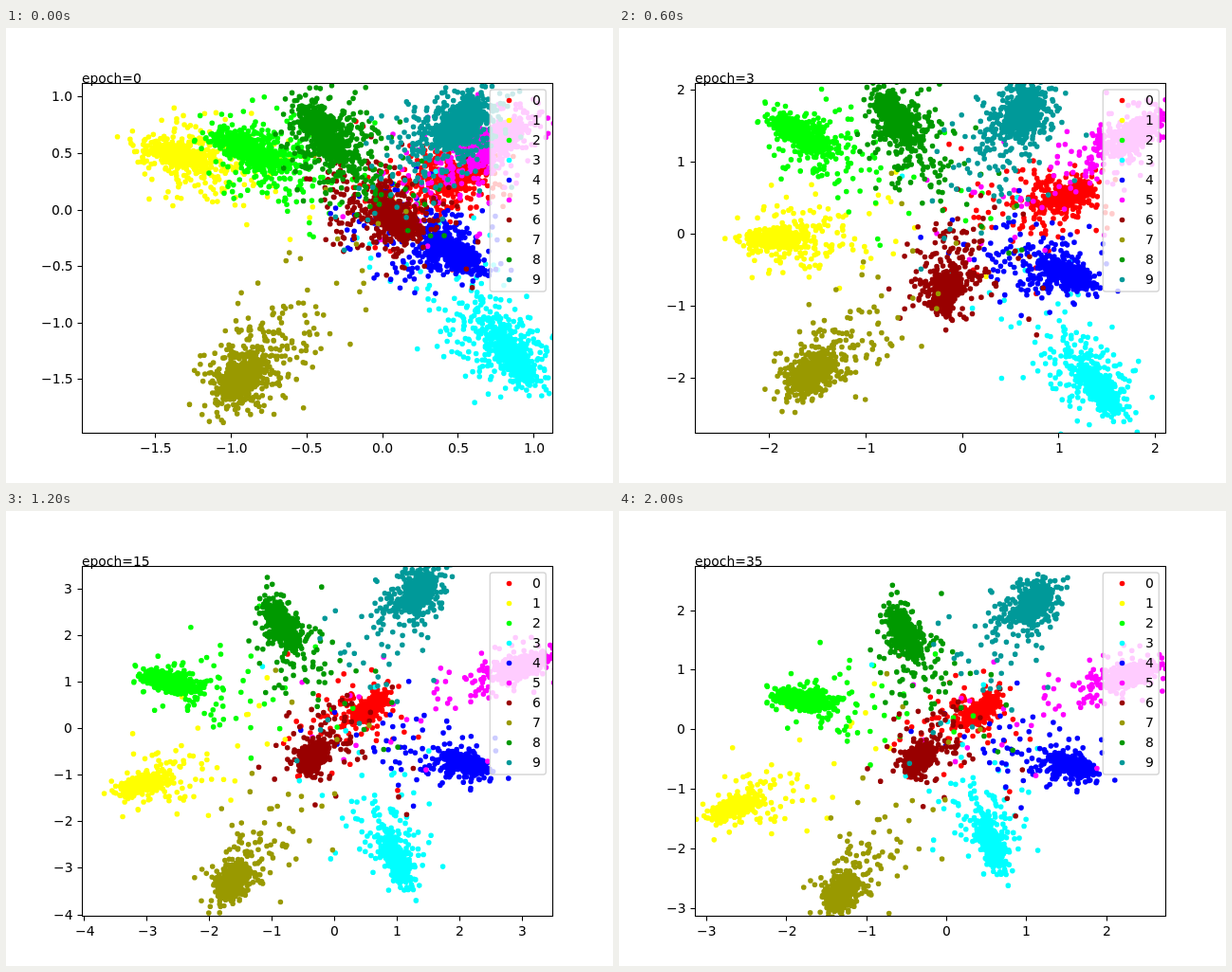
Recreate the animation shown at these times as an HTML page with a canvas. Size 640 by 480 pixels, loop 2200 ms.

```html
<!DOCTYPE html>
<html lang="en">
<head>
<meta charset="utf-8">
<title>Clusters by epoch</title>
<style>
  html, body { margin: 0; width: 100%; height: 100%; overflow: hidden; background: #fff; }
  canvas { display: block; }
</style>
</head>
<body>
<canvas id="stage" width="640" height="480"></canvas>
<script>
const ctx = document.getElementById('stage').getContext('2d');
const STEP = 200;
const STEPS = 11;
const BOX = { l: 80, t: 58, r: 576, b: 427 };
const COUNT = 800;
const DOT = 2.8;

// Camera: pixels per unit and pixel of zero, for x then y
const VIEW_KEYS = [0, 1, 2, 4, 6, 8, 10];
const VIEWS = [
  [159.6, 397, 119.2, 191.4], [136.3, 379.2, 101.7, 204.6],
  [119.5, 366.5, 89, 214], [84.4, 357.5, 63, 220.5],
  [65.9, 346.5, 49.1, 229], [69.8, 351.7, 52.1, 225],
  [84.3, 345.5, 62.8, 230]
];
const PATH_KEYS = [0, 2, 4, 6, 10];

const groups = [];

function randomFrom(seed) {
  return () => {
    seed = (seed + 0x6D2B79F5) | 0;
    let t = Math.imul(seed ^ (seed >>> 15), seed | 1);
    t ^= t + Math.imul(t ^ (t >>> 7), t | 61);
    return ((t ^ (t >>> 14)) >>> 0) / 4294967296;
  };
}

// path holds the centre in plot units; long and short are the first spread in pixels
function addGroup(color, long, short, path) {
  const rnd = randomFrom(groups.length * 977 + 31);
  const bell = () => (rnd() + rnd() + rnd() - 1.5) * 2;
  const points = Array.from({ length: COUNT }, () => ({
    kind: rnd(), a: bell(), b: bell(), reach: -Math.log(1 - rnd() * 0.97), pull: rnd()
  }));
  groups.push({ color, long, short, path, points });
}

addGroup('#f00', 16, 7, [[0.52, 0.31], [1.01, 0.63], [1.21, 0.44], [0.57, 0.45], [0.44, 0.33]]);
addGroup('#ff0', 17, 6, [[-1.36, 0.48], [-1.69, 0.11], [-2.16, -0.26], [-3.06, -1.2], [-2.65, -1.31]]);
addGroup('#0f0', 20, 7, [[-0.89, 0.53], [-1.37, 1.2], [-1.98, 1.55], [-2.65, 0.98], [-1.81, 0.48]]);
addGroup('#0ff', 20, 7, [[0.85, -1.29], [1.31, -1.78], [1.51, -2.5], [0.99, -2.81], [0.56, -1.91]]);
addGroup('#00f', 17, 6, [[0.46, -0.38], [0.78, -0.58], [1.39, -0.55], [2.1, -0.77], [1.57, -0.62]]);
addGroup('#f0f', 21, 8, [[0.77, 0.62], [1.45, 1.19], [2.16, 1.63], [3.01, 1.34], [2.31, 0.92]]);
addGroup('#900', 12, 7, [[0.09, -0.11], [-0.22, -0.82], [-0.15, -0.82], [-0.36, -0.63], [-0.36, -0.51]]);
addGroup('#990', 16, 10, [[-0.93, -1.5], [-1.39, -1.55], [-1.75, -2.34], [-1.62, -3.28], [-1.31, -2.74]]);
addGroup('#090', 20, 9, [[-0.39, 0.7], [-0.71, 1.42], [-0.68, 1.83], [-0.86, 2.26], [-0.54, 1.64]]);
addGroup('#099', 17, 11, [[0.53, 0.77], [0.59, 1.42], [0.68, 1.96], [1.34, 2.93], [1.09, 2.12]]);

const mix = (a, b, f) => a + (b - a) * f;

// Linear blend of rows placed at the given keys
function blend(keys, rows, at) {
  let k = 0;
  while (k < keys.length - 2 && at > keys[k + 1]) k++;
  const f = (at - keys[k]) / (keys[k + 1] - keys[k]);
  return rows[k].map((v, j) => mix(v, rows[k + 1][j], f));
}

function dot(x, y) {
  ctx.moveTo(x + DOT, y);
  ctx.arc(x, y, DOT, 0, Math.PI * 2);
}

// Each cloud points away from the plot's zero; its loose points drift back to it
function drawGroup(g, at, [sx, x0, sy, y0]) {
  const [px, py] = blend(PATH_KEYS, g.path, at);
  const dx = px * sx, dy = -py * sy;
  const cx = x0 + dx, cy = y0 + dy;
  const far = Math.hypot(dx, dy);
  const cos = dx / far, sin = dy / far;
  const settle = Math.min(1, at / 6);
  const size = mix(1, 0.65, settle);
  const stray = mix(0.045, 0.025, settle);
  const loose = mix(0.3, 0.13, settle);
  const halo = mix(25, 19, settle);
  ctx.fillStyle = g.color;
  ctx.beginPath();
  for (const p of g.points) {
    if (p.kind < stray) {
      const t = 0.1 + 0.75 * p.pull;
      dot(cx - dx * t + p.a * 42, cy - dy * t + p.b * 36);
    } else if (p.kind < loose) {
      const back = p.reach * 27;
      dot(cx - cos * back + p.a * halo, cy - sin * back + p.b * halo * 0.8);
    } else {
      const stretch = size * (0.55 + 0.35 * p.reach);
      const u = p.a * g.long * stretch, v = p.b * g.short * stretch;
      dot(cx + u * cos - v * sin, cy + u * sin + v * cos);
    }
  }
  ctx.fill();
}

// Places text on whole pixels; shift is the part of its width left of x
function text(str, x, y, shift = 0) {
  const left = x - ctx.measureText(str).width * shift;
  ctx.fillText(str, Math.round(left), Math.round(y));
}

function line(x1, y1, x2, y2) {
  ctx.beginPath();
  ctx.moveTo(x1, y1);
  ctx.lineTo(x2, y2);
  ctx.stroke();
}

function ticks(scale, zero, from, to, put) {
  const step = (to - from) / Math.abs(scale) > 4.6 ? 1 : 0.5;
  for (let v = -4; v <= 4; v += step) {
    const p = zero + v * scale;
    if (p < from || p > to) continue;
    const label = Math.abs(v).toFixed(step < 1 ? 1 : 0);
    put(p, v < 0 ? '\u2212' + label : label);
  }
}

function drawAxes([sx, x0, sy, y0]) {
  ctx.strokeStyle = ctx.fillStyle = '#000';
  ctx.lineWidth = 1.1;
  ctx.strokeRect(BOX.l + 0.5, BOX.t + 0.5, BOX.r - BOX.l, BOX.b - BOX.t);
  ticks(sx, x0, BOX.l, BOX.r, (x, label) => {
    const mid = Math.floor(x) + 0.5;
    line(mid, BOX.b + 1, mid, BOX.b + 5.5);
    text(label, x, 448, 0.5);
  });
  ticks(-sy, y0, BOX.t, BOX.b, (y, label) => {
    const mid = Math.round(y + 0.1) + 0.5;
    line(BOX.l - 4.5, mid, BOX.l, mid);
    text(label, 70.3, y + 5.1, 1);
  });
}

function drawLegend() {
  ctx.beginPath();
  ctx.roundRect(510.3, 65, 59, 213, 2.8);
  ctx.fillStyle = 'rgba(255,255,255,0.8)';
  ctx.fill();
  ctx.strokeStyle = 'rgba(204,204,204,0.8)';
  ctx.lineWidth = 1.39;
  ctx.stroke();
  groups.forEach((g, i) => {
    const y = 76 + i * 21;
    ctx.fillStyle = g.color;
    ctx.beginPath();
    dot(530.5, y + 0.5);
    ctx.fill();
    ctx.fillStyle = '#000';
    text(String(i), 555.2, y + 5);
  });
}

function draw(at) {
  const view = blend(VIEW_KEYS, VIEWS, at);
  const epoch = at < 5 ? at : (at - 3) * 5;
  ctx.fillStyle = '#fff';
  ctx.fillRect(0, 0, 640, 480);
  ctx.font = '13.89px "DejaVu Sans", sans-serif';
  ctx.save();
  ctx.beginPath();
  ctx.rect(BOX.l, BOX.t, BOX.r - BOX.l, BOX.b - BOX.t);
  ctx.clip();
  groups.forEach(g => drawGroup(g, at, view));
  ctx.restore();
  drawAxes(view);
  text('epoch=' + epoch, 80.3, 58);
  drawLegend();
}

let shown = -1;
function tick() {
  const at = Math.floor(performance.now() / STEP) % STEPS;
  if (at !== shown) draw(shown = at);
  requestAnimationFrame(tick);
}
tick();
</script>
</body>
</html>
```
